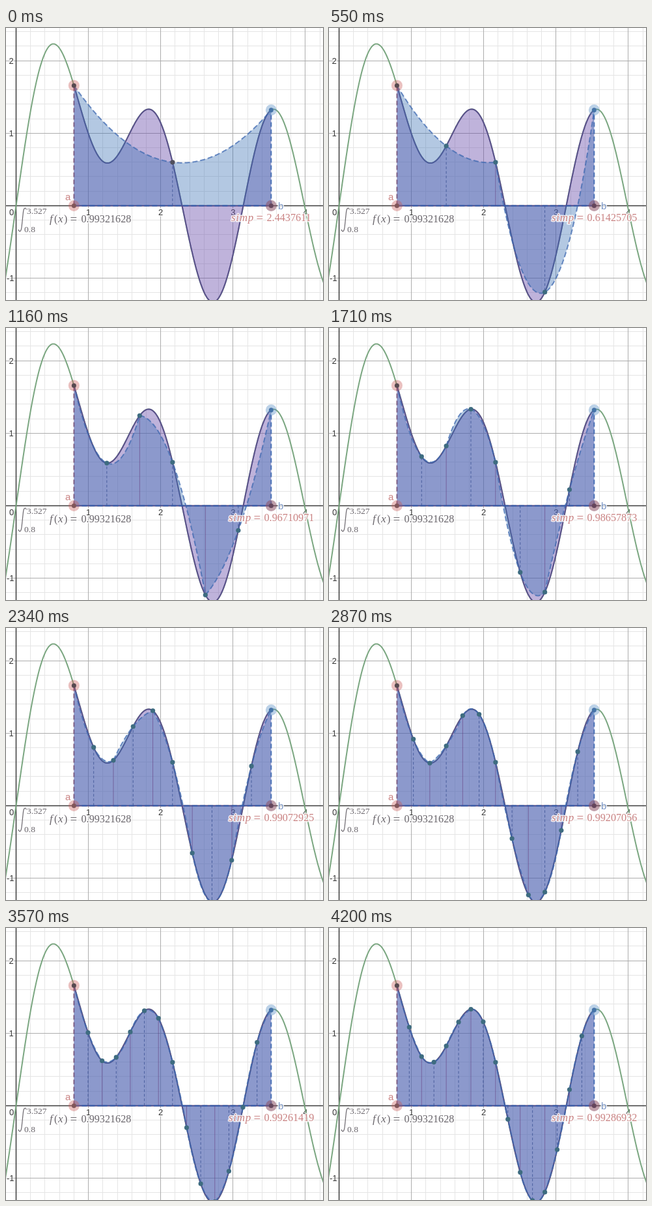
An HTML page with a canvas that plays this animation: 487x417 px, repeating every 5.65 s.

```html
<!DOCTYPE html>
<html lang="en">
<head>
<meta charset="utf-8">
<title>Simpson's rule</title>
<style>
html, body { margin: 0; height: 100%; overflow: hidden; background: #fff; }
canvas { display: block; }
</style>
</head>
<body>
<canvas id="stage" width="487" height="417"></canvas>
<script>
const ctx = document.getElementById('stage').getContext('2d');
const W = 487, H = 417, UNIT = 111.1, X0 = 15.5, Y0 = 272.4;
const A = 0.8, B = 3.527, LOOP = 5650;
const STARTS = [0, 550, 1160, 1710, 2340, 2870, 3570, 4200];
const SERIF = '"Liberation Serif", serif', SANS = '"Liberation Sans", sans-serif';
const RED = '#c98282', BLUE = '#7894c4', GREY = '#69656b';

const f = x => Math.sin(x) + Math.sin(2 * x) + Math.sin(4 * x);
const F = x => -Math.cos(x) - Math.cos(2 * x) / 2 - Math.cos(4 * x) / 4;
const px = x => X0 + x * UNIT;
const py = y => Y0 - y * UNIT;
const snap = v => Math.floor(v) + 0.5;

// Panel i of n: its ends, its area and the parabola through three points
function panel(i, n) {
  const h = (B - A) / n / 2, l = A + 2 * i * h, m = l + h, r = m + h;
  const yl = f(l), ym = f(m), yr = f(r);
  const curve = x => {
    const t = (x - m) / h;
    return ym + t * (yr - yl) / 2 + t * t * ((yl + yr) / 2 - ym);
  };
  return { l, m, r, curve, area: h / 3 * (yl + 4 * ym + yr) };
}

function trace(fn, from, to) {
  const steps = Math.ceil((to - from) * UNIT);
  for (let i = 0; i <= steps; i++) {
    const x = from + (to - from) * i / steps;
    ctx.lineTo(px(x), py(fn(x)));
  }
}

function stroke(color, width, dash = []) {
  ctx.strokeStyle = color;
  ctx.lineWidth = width;
  ctx.setLineDash(dash);
  ctx.stroke();
}

function line(x1, y1, x2, y2, color, width, dash) {
  ctx.beginPath();
  ctx.moveTo(x1, y1);
  ctx.lineTo(x2, y2);
  stroke(color, width, dash);
}

function area(fn, from, to, color) {
  ctx.beginPath();
  ctx.moveTo(px(from), Y0);
  trace(fn, from, to);
  ctx.lineTo(px(to), Y0);
  ctx.fillStyle = color;
  ctx.fill();
}

function plot(fn, from, to, color, width, dash) {
  ctx.beginPath();
  trace(fn, from, to);
  stroke(color, width, dash);
}

function dot(x, y, r, color) {
  ctx.beginPath();
  ctx.arc(px(x), py(y), r, 0, 7);
  ctx.fillStyle = color;
  ctx.fill();
}

function label(text, x, y, font, color, spacing = 0) {
  ctx.font = font;
  ctx.letterSpacing = spacing + 'px';
  ctx.setLineDash([]);
  ctx.lineJoin = 'round';
  ctx.strokeStyle = 'rgba(255,255,255,.85)';
  ctx.lineWidth = 3;
  ctx.strokeText(text, x, y);
  ctx.fillStyle = color;
  ctx.fillText(text, x, y);
}

function drawGrid() {
  for (const major of [false, true]) {
    const color = major ? '#adadad' : '#e5e5e5';
    for (let i = -6; i < 24; i++) {
      if ((i % 5 === 0) !== major) continue;
      const x = snap(px(i / 5)), y = snap(py(i / 5));
      line(x, 0, x, H, color, 1);
      line(0, y, W, y, color, 1);
    }
  }
  line(X0, 0, X0, H, '#3c3c3c', 1.5);
  line(0, Y0, W, Y0, '#3c3c3c', 1.5);
  const font = '13px ' + SANS;
  label('0', 5, 287, font, '#333');
  for (let i = 1; i < 5; i++) label(i, px(i) - 3.6, 287, font, '#333');
  label('2', 4.5, 55, font, '#333');
  label('1', 4.5, 166, font, '#333');
  label('-1', 1, 388, font, '#333');
}

function drawFormula() {
  ctx.beginPath();
  ctx.moveTo(31.5, 279);
  ctx.bezierCurveTo(30.5, 274, 27, 275, 26.3, 284);
  ctx.lineTo(24.3, 303);
  ctx.bezierCurveTo(23.5, 313, 20.5, 313.5, 19, 309);
  stroke(GREY, 1.2);
  label(B, 32, 284.5, '13.5px ' + SERIF, GREY);
  label(A, 28, 313, '13.5px ' + SERIF, GREY);
  label('f', 67, 298, 'italic 17px ' + SERIF, GREY);
  label('(', 74, 298, '16px ' + SERIF, GREY);
  label('x', 80, 298, 'italic 17px ' + SERIF, GREY);
  label(')', 89, 298, '16px ' + SERIF, GREY);
  label('=', 98.5, 299, '19px ' + SERIF, GREY);
  label((F(B) - F(A)).toPrecision(8), 115.5, 298, '16.2px ' + SERIF, GREY);
}

function drawSum(sum) {
  const text = sum.toPrecision(8), x = text.length < 10 ? 346 : 342;
  label('simp', x, 296, 'italic 17px ' + SERIF, RED, 0.7);
  label('=', x + 38.5, 297, '19px ' + SERIF, RED);
  label(text, x + 54.5, 296, '16.2px ' + SERIF, RED);
}

function draw(n) {
  const panels = Array.from({ length: n }, (_, i) => panel(i, n));
  ctx.fillStyle = '#fff';
  ctx.fillRect(0, 0, W, H);
  drawGrid();
  plot(f, -0.2, 4.3, '#7aa680', 2);

  area(f, A, B, 'rgba(96,66,166,.4)');
  plot(f, A, B, 'rgba(84,66,140,.8)', 2);
  line(px(A), Y0, px(B), Y0, 'rgba(84,66,150,.7)', 2);

  for (const p of panels) {
    area(p.curve, p.l, p.r, 'rgba(55,112,178,.38)');
    plot(p.curve, p.l, p.r, 'rgba(62,104,176,.75)', 2, [8, 4]);
    line(px(p.l), Y0, px(p.r), Y0, 'rgba(45,95,175,.75)', 2, [8, 4]);
    line(px(p.m), Y0, px(p.m), py(f(p.m)), 'rgba(62,84,150,.85)', 1, [4, 3]);
    if (p.l > A) line(px(p.l), Y0, px(p.l), py(f(p.l)), 'rgba(100,65,130,.6)', 1);
  }
  line(px(A), Y0, px(A), py(f(A)), 'rgba(112,72,112,.85)', 1.8, [7, 4]);
  line(px(B), Y0, px(B), py(f(B)), 'rgba(62,104,176,.9)', 2, [7, 4]);

  const dotColor = n === 1 ? '#50505c' : '#3e6c80';
  for (const p of panels) {
    dot(p.m, f(p.m), 3.6, dotColor);
    if (p.l > A) dot(p.l, f(p.l), 3.6, dotColor);
  }
  for (const y of [0, f(A)]) {
    dot(A, y, 8.5, 'rgba(199,90,86,.38)');
    dot(A, y, 3.5, y ? '#574a50' : '#82565a');
  }
  dot(B, 0, 8.5, 'rgba(140,80,100,.55)');
  dot(B, 0, 3.5, '#65465c');
  dot(B, f(B), 8.5, 'rgba(85,140,195,.4)');
  dot(B, f(B), 3.5, '#4674a8');

  label('a', 91, 264, '15px ' + SANS, RED);
  label('b', 418, 278, '15px ' + SANS, BLUE);
  drawFormula();
  drawSum(panels.reduce((s, p) => s + p.area, 0));
}

const start = performance.now();
function tick() {
  const t = (performance.now() - start) % LOOP;
  draw(STARTS.filter(s => s <= t).length);
  requestAnimationFrame(tick);
}
tick();
</script>
</body>
</html>
```
